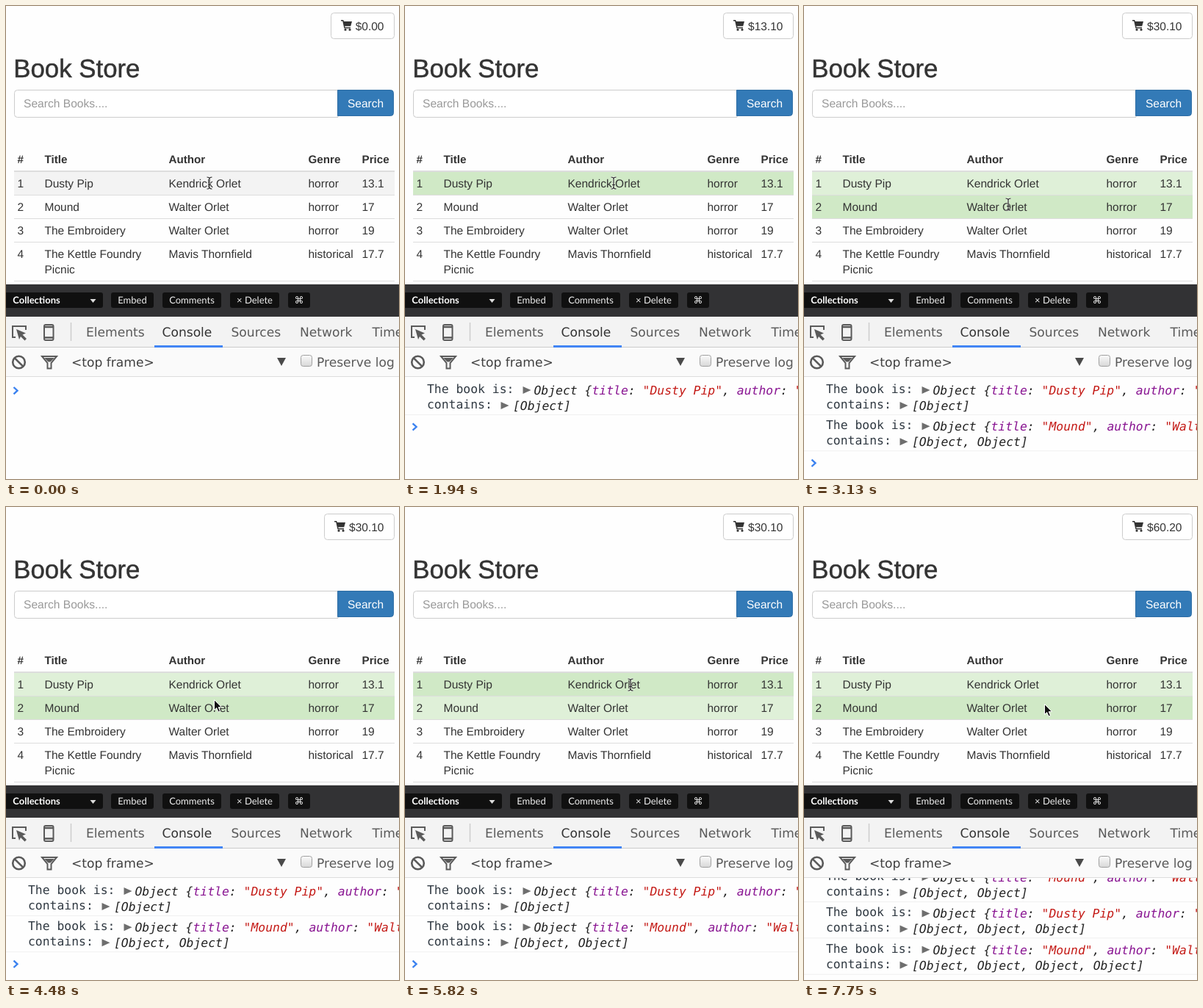
Recreate the animation shown at these times as an HTML page. Size 535 by 644 pixels, loop 8 s.

```html
<!DOCTYPE html>
<html lang="en">
<head>
<meta charset="utf-8">
<title>Book Store</title>
<style>
  html, body { margin: 0; width: 100%; height: 100%; overflow: hidden; background: #fefefe; }
  svg { display: block; }
  text { white-space: pre; text-rendering: geometricPrecision; }
  .page { font: 15.5px "Liberation Sans", Arial, sans-serif; fill: #333; }
  .head { font-size: 15.2px; font-weight: 700; }
  .bar { font: 13px Lato, sans-serif; fill: #eee; text-anchor: middle; }
  .tools { font: 17.1px "DejaVu Sans", sans-serif; fill: #5a5a5a; }
  .log { font: 16.4px "DejaVu Sans Mono", monospace; fill: #303942; }
  .log i, .obj { font-style: italic; fill: #222; }
  .key { fill: #881391; }
  .str { fill: #c41a16; }
</style>
</head>
<body>
<svg width="535" height="644" viewBox="0 0 535 644">
  <defs>
    <clipPath id="pane"><rect y="505" width="535" height="139"/></clipPath>
    <linearGradient id="box" x2="0" y2="1"><stop stop-color="#fafafa"/><stop offset="1" stop-color="#d8d8d8"/></linearGradient>
  </defs>
  <rect width="535" height="644" fill="#fefefe"/>

  <g class="page">
    <rect id="button" y="9.5" height="35" rx="4" fill="#fff" stroke="#ccc"/>
    <g id="cart">
      <path d="M0 0H3.2L4 2H15L13.2 8.6H5.2L5.6 10H13V11.5H4.4L2.2 1.6H0Z"/>
      <circle cx="6" cy="13.2" r="1.5"/><circle cx="12" cy="13.2" r="1.5"/>
    </g>
    <text id="total" x="514.5" y="33" text-anchor="end"></text>

    <text x="10.3" y="97" font-size="34.8" stroke="#333" stroke-width=".5">Book Store</text>
    <path d="M452 114.5H15.500a4 4 0 0 0-4 4V147.500a4 4 0 0 0 4 4H452Z" fill="#fff" stroke="#ccc"/>
    <text x="24" y="138" fill="#999" font-size="15.6">Search Books....</text>
    <path d="M451.500 114.500H523.500a4 4 0 0 1 4 4V145.500a4 4 0 0 1-4 4H451.500Z" fill="#337ab7" stroke="#2e6da4"/>
    <text x="465" y="138" fill="#fff">Search</text>

    <rect id="row1" x="11" y="226" width="518" height="31"/>
    <rect id="row2" x="11" y="258" width="518" height="31"/>
    <path d="M11 225H529" stroke="#ddd" stroke-width="2"/>
    <path d="M11 257.500H529M11 289.500H529M11 321.500H529M11 374.500H529" stroke="#ddd"/>
    <g id="table"></g>
  </g>

  <rect y="379" width="535" height="44" fill="#323234"/>
  <g fill="#101010">
    <rect x="-4" y="390" width="136" height="21" rx="3"/>
    <rect x="143" y="390" width="58" height="21" rx="3"/>
    <rect x="213" y="390" width="80" height="21" rx="3"/>
    <rect x="305" y="390" width="67" height="21" rx="3"/>
    <rect x="384" y="390" width="30" height="21" rx="3"/>
  </g>
  <g class="bar">
    <text x="41.500" y="405" font-weight="700" fill="#fff">Collections</text>
    <path d="M114.500 399H122.500L118.500 404Z" fill="#ddd"/>
    <text x="172" y="405">Embed</text>
    <text x="253" y="405">Comments</text>
    <text x="338.500" y="405">× Delete</text>
    <text x="399" y="405" style="font-family:'DejaVu Sans',sans-serif">⌘</text>
  </g>

  <rect y="423" width="535" height="42" fill="#f3f3f3"/>
  <rect y="465" width="535" height="39" fill="#fafafa"/>
  <path d="M0 464.500H535" stroke="#ccc"/>
  <path d="M0 504.500H535" stroke="#ddd"/>
  <path d="M88.500 431V456" stroke="#ccc" stroke-width="1.500"/>
  <rect x="202" y="462" width="93" height="3" fill="#4285f4"/>
  <g fill="none" stroke="#5a5a5a" stroke-width="2">
    <path d="M13 451H9V436H27V441"/>
    <rect x="52" y="434" width="12.500" height="21" rx="2"/>
    <path d="M52 437H64M52 451.500H64" stroke-width="2.500"/>
    <circle cx="17.500" cy="485" r="8.300" stroke-width="2.600"/>
    <path d="M11.800 479.300L23.200 490.700" stroke-width="2.600"/>
    <path d="M49 477H69L61.500 486V493.500H56.500V486Z"/>
  </g>
  <path d="M14 440L27 445.500L22.500 447.500L28 453L25.500 455.500L20 450L18 454Z" fill="#5a5a5a"/>
  <path d="M52 479H66L60.500 484.500H57.500Z" fill="#5a5a5a"/>
  <g class="tools">
    <text x="109" y="450">Elements</text>
    <text x="212.500" y="450" fill="#333">Console</text>
    <text x="306.500" y="450">Sources</text>
    <text x="400" y="450">Network</text>
    <text x="498.500" y="450">Timeline</text>
    <text x="89" y="491" fill="#404040">&lt;top frame&gt;</text>
    <text x="423" y="491">Preserve log</text>
  </g>
  <path d="M369 479H381L375 490Z" fill="#4a4a4a"/>
  <rect x="401.500" y="475.500" width="15" height="15" rx="3" fill="url(#box)" stroke="#a0a0a0"/>

  <g clip-path="url(#pane)">
    <g id="console">
      <g id="logs" class="log"></g>
      <path id="prompt" d="M10.500 519L15.500 523.700L10.500 528.400" fill="none" stroke="#3b82f0" stroke-width="2.400"/>
    </g>
  </g>

  <g id="beam" fill="none">
    <path id="ibar" d="M-3.500 -8Q0 -8 0 -5.500Q0 -8 3.500 -8M0 -6V6M-3.500 8Q0 8 0 5.500Q0 8 3.500 8M-2 2.500H2" stroke="#fff" stroke-width="2.600" stroke-opacity=".7"/>
    <path d="M-3.500 -8Q0 -8 0 -5.500Q0 -8 3.500 -8M0 -6V6M-3.500 8Q0 8 0 5.500Q0 8 3.500 8M-2 2.500H2" stroke="#222" stroke-width="1.200"/>
  </g>
  <path id="arrow" d="M.5 .5V14.500L3.700 11.500L6 17L8.500 16L6.200 10.700H10.500Z" fill="#111" stroke="#fff" stroke-width="1"/>
</svg>
<script>
const $ = id => document.getElementById(id);
const LOOP = 8000, PITCH = 49.3, CHAR = 9.87;

const books = [
  ["1", "Dusty Pip", "Kendrick Orlet", "horror", "13.1"],
  ["2", "Mound", "Walter Orlet", "horror", "17"],
  ["3", "The Embroidery", "Walter Orlet", "horror", "19"],
  ["4", "The Kettle Foundry", "Mavis Thornfield", "historical", "17.7"]
];
const columns = [15.5, 52.5, 221.5, 411.5, 484.5];

// Each click adds a book to the cart.
const clicks = [[440, 0], [3130, 1], [6120, 0], [7750, 1]];
const hovers = [[0, 0], [2240, 1], [4630, 0], [7160, 1]];
const moves = [
  [0, "beam", 277, 241], [150, "beam", 283, 241], [1940, "beam", 284, 241],
  [2090, "arrow", 281, 257], [2240, "arrow", 281, 261], [2390, "beam", 278, 270],
  [4480, "arrow", 283, 262], [4630, "arrow", 289, 251], [4770, "arrow", 297, 224],
  [5520, "beam", 308, 239], [5670, "beam", 305, 240], [5820, "beam", 307, 242],
  [6860, "beam", 310, 242], [7010, "arrow", 319, 251], [7160, "arrow", 326, 268],
  [7310, "arrow", 327, 268]
];

const text = (x, y, body, cls = "") => `<text x="${x}" y="${y}" class="${cls}">${body}</text>`;
const span = (cls, body) => `<tspan class="${cls}">${body}</tspan>`;
const tri = (x, y) => `<path d="M${x} ${y - 5}L${x + 11} ${y}L${x} ${y + 5}Z" fill="#6e6e6e"/>`;
const row = (cells, y, cls) => cells.map((c, i) => text(columns[i], y, c, cls)).join("");
const latest = (list, t) => list.filter(e => e[0] <= t).pop();

$("table").innerHTML =
  row(["#", "Title", "Author", "Genre", "Price"], 214, "head") +
  books.map((b, i) => row(b, 247 + 32 * i)).join("") +
  text(columns[1], 364, "Picnic");

function entry([, book], i) {
  const [, title, author] = books[book];
  const object = "Object {" + span("key", "title") + ": " + span("str", `"${title}"`) +
    ", " + span("key", "author") + ": " + span("str", `"${author}"`);
  const list = "[" + Array(i + 1).fill("Object").join(", ") + "]";
  return `<g transform="translate(0 ${PITCH * i})">` +
    text(30, 527, "The book is:") + tri(160.5, 523) + text(175.5, 529, object, "obj") +
    text(30, 548, "contains:") + tri(130.5, 544) + text(30 + 12 * CHAR - 1.5, 550, list, "obj") +
    `<path d="M0 556.5H535" stroke="#f0f0f0"/></g>`;
}
$("logs").innerHTML = clicks.map(entry).join("");
const logs = [...$("logs").children];

function draw(t) {
  const done = clicks.filter(c => c[0] <= t);
  const n = done.length;
  const sum = done.reduce((s, c) => s + Number(books[c[1]][4]), 0);

  const left = n ? 433.5 : 442.5;
  $("button").setAttribute("x", left);
  $("button").setAttribute("width", 528.5 - left);
  $("cart").setAttribute("transform", `translate(${left + 13.5} 19)`);
  $("total").textContent = "$" + sum.toFixed(2);

  const hover = latest(hovers, t)[1];
  [0, 1].forEach(i => {
    const bought = done.some(c => c[1] === i);
    const [over, idle] = bought ? ["#d0e9c6", "#dff0d8"] : ["#f3f3f3", "none"];
    $("row" + (i + 1)).setAttribute("fill", hover === i ? over : idle);
  });

  logs.forEach((g, i) => g.style.display = i < n ? "" : "none");
  $("prompt").setAttribute("transform", `translate(0 ${PITCH * n})`);
  $("console").setAttribute("transform", `translate(0 ${-Math.max(0, PITCH * n - 129)})`);

  const [, kind, x, y] = latest(moves, t);
  ["beam", "arrow"].forEach(id => $(id).style.display = id === kind ? "" : "none");
  $(kind).setAttribute("transform", `translate(${x} ${y})`);
}

const start = performance.now();
function tick(now) {
  draw(Math.max(0, now - start) % LOOP);
  requestAnimationFrame(tick);
}
draw(0);
requestAnimationFrame(tick);
</script>
</body>
</html>
```
